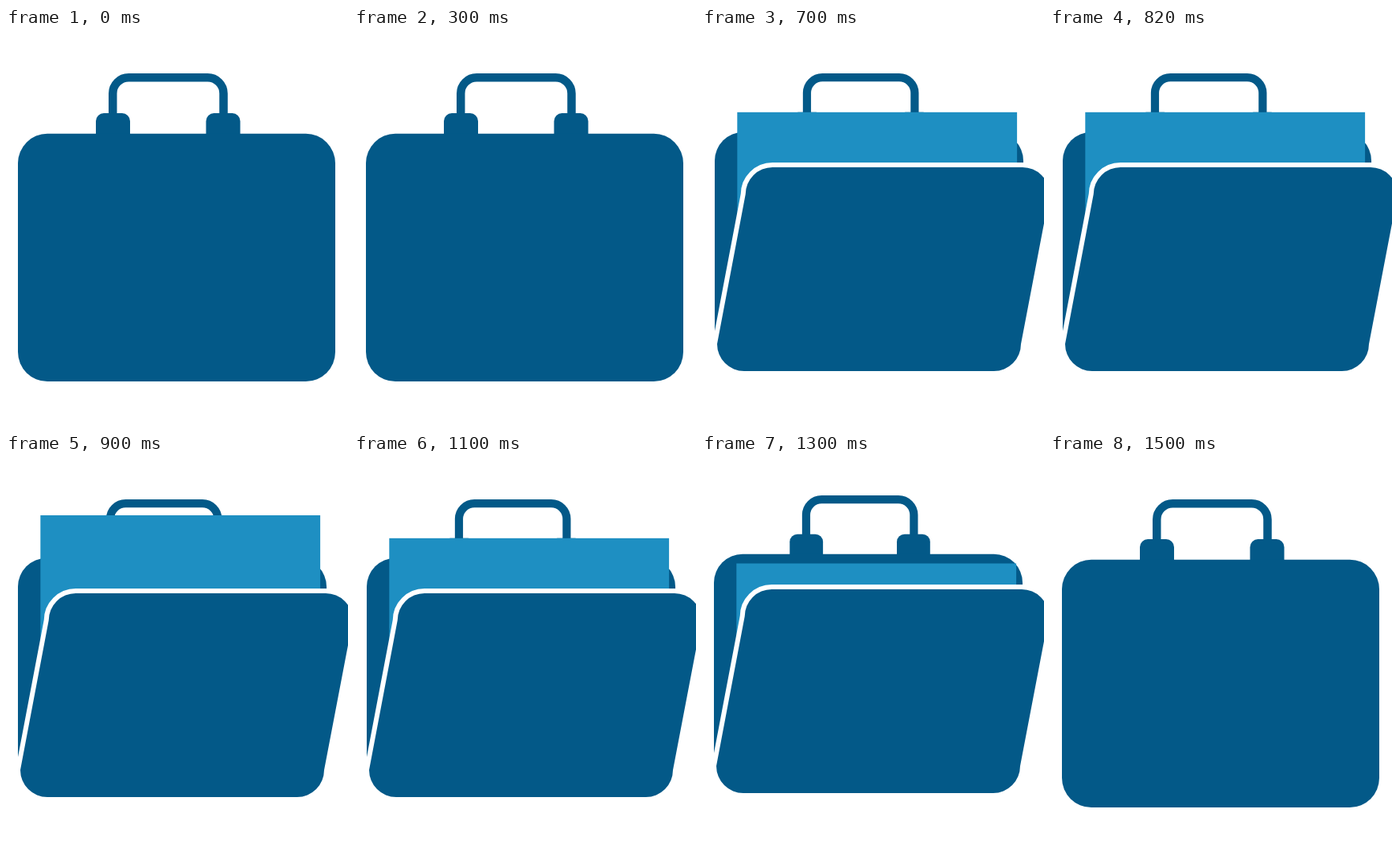
An HTML page that plays this animation: 430 by 500 pixels, repeating every 1.6 s.

```html
<!DOCTYPE html>
<html lang="en">
<head>
<meta charset="utf-8">
<title>Opening briefcase</title>
<style>
  html, body { margin: 0; width: 100%; height: 100%; overflow: hidden; background: #fff; }
  svg { display: block; width: 430px; height: 500px; }
</style>
</head>
<body>
<svg viewBox="0 0 430 500" fill="#035988">
  <g id="bag">
    <path d="M134.25 115V82.25a20 20 0 0 1 20-20H253.5a20 20 0 0 1 20 20V115" fill="none" stroke="#035988" stroke-width="10.5"/>
    <rect x="113" y="107" width="43" height="45" rx="10"/>
    <rect x="251.5" y="107" width="43" height="45" rx="10"/>
    <rect x="15" y="132.8" width="399" height="311.2" rx="37"/>
  </g>
  <g id="contents">
    <rect id="paper" x="43.3" width="351.8" height="240" fill="#1e8fc2"/>
    <path d="M53.7 204a34 34 0 0 1 34-34H402a34 34 0 0 1 34 34L400 392a34 34 0 0 1-34 34H52a34 34 0 0 1-34-34Z"
          stroke="#fff" stroke-width="12" paint-order="stroke"/>
  </g>
</svg>
<script>
const LOOP = 1600;
const bag = document.getElementById('bag');
const contents = document.getElementById('contents');
const paper = document.getElementById('paper');

const closed = { open: false };
const ajar = { open: true, x: 0, y: 0, paperTop: 137.5 };
const rising = { open: true, x: 1, y: 5, paperTop: 105.8 };
const raised = { open: true, x: 0, y: 5, paperTop: 77 };

// Each pose holds until its end time, then switches at once.
const poses = [
  [500, closed], [700, ajar], [900, rising], [1100, raised],
  [1300, rising], [1500, ajar], [LOOP, closed]
];

function render(time) {
  const t = time % LOOP;
  const pose = poses.find(([end]) => t < end)[1];
  contents.style.display = pose.open ? '' : 'none';
  if (pose.open) {
    const { x, y, paperTop } = pose;
    bag.setAttribute('transform', `translate(${15 + x} ${52 + y}) scale(.9725) translate(-15 -57)`);
    contents.setAttribute('transform', `translate(${x} ${y})`);
    paper.setAttribute('y', paperTop - y);
  } else {
    bag.removeAttribute('transform');
  }
}

const start = performance.now();
function tick() {
  render(performance.now() - start);
  requestAnimationFrame(tick);
}
tick();
</script>
</body>
</html>
```
